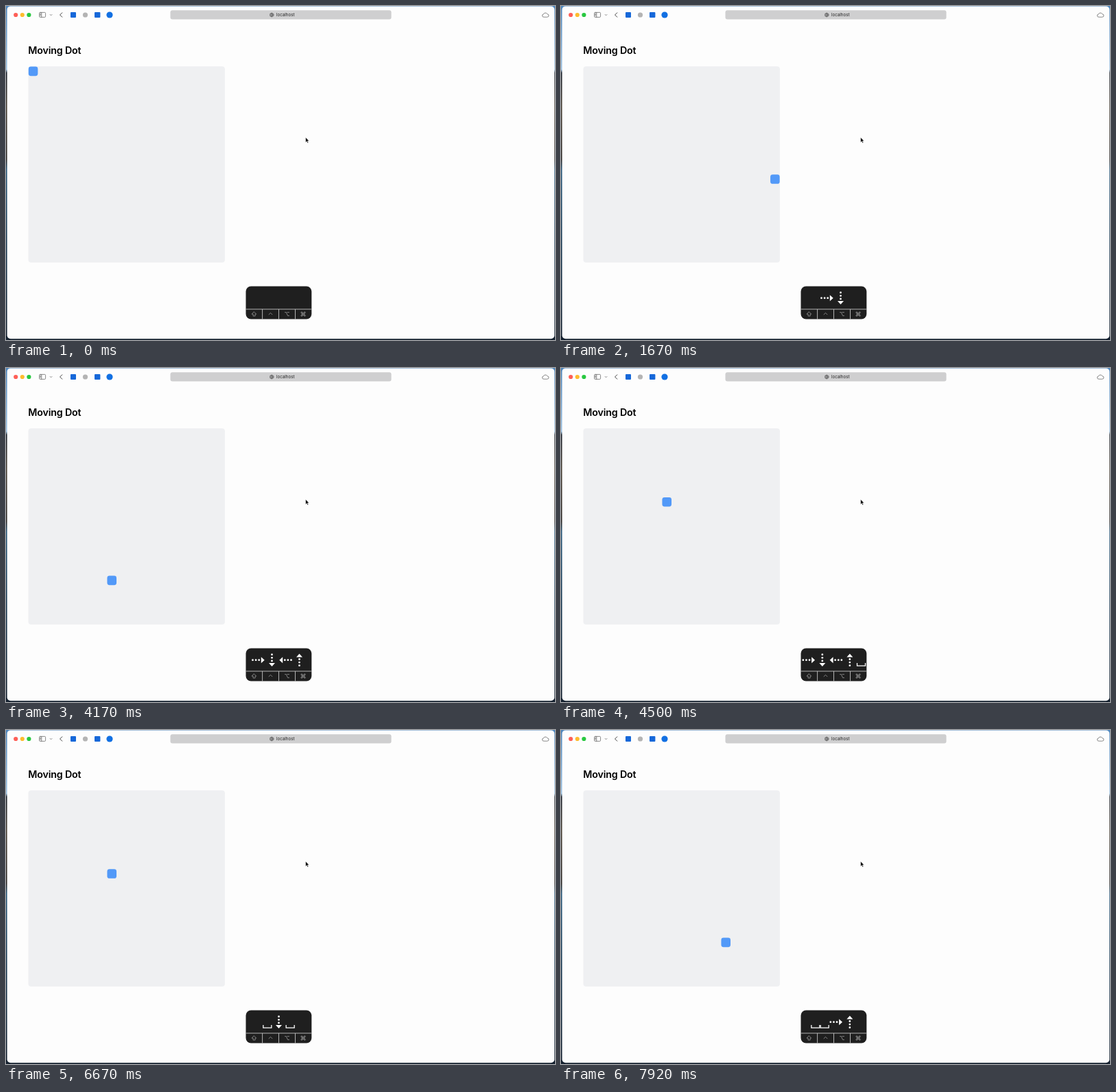
Animation, 800 px wide and 488 px high, one loop 8000 ms. Source, as an HTML page:

```html
<!DOCTYPE html>
<html lang="en">
<head>
<meta charset="utf-8">
<title>Moving Dot</title>
<style>
html, body { margin: 0; width: 100%; height: 100%; overflow: hidden; }
svg { display: block; width: 100vw; height: 100vh; }
text { font-family: Inter, "Liberation Sans", sans-serif; }
.line { fill: none; stroke-linecap: round; stroke-linejoin: round; }
</style>
</head>
<body>
<svg viewBox="0 0 800 488">
  <defs>
    <linearGradient id="desktop" x2="0" y2="1">
      <stop offset="0" stop-color="#4e86bd"/>
      <stop offset=".19" stop-color="#9fc4e4"/>
      <stop offset=".2" stop-color="#20262f"/>
      <stop offset=".3" stop-color="#4a4238"/>
      <stop offset=".46" stop-color="#2f2c2a"/>
      <stop offset=".49" stop-color="#2c5a7c"/>
      <stop offset=".7" stop-color="#1d3c55"/>
      <stop offset="1" stop-color="#15212f"/>
    </linearGradient>
    <g id="arrow" fill="#fff">
      <circle cx="-8" r="1.4"/><circle cx="-3.4" r="1.4"/><circle cx="1.2" r="1.4"/>
      <path d="M4.3 -4.5L9.2 0L4.3 4.5Z"/>
    </g>
    <path id="space" class="line" style="stroke-linecap:butt;stroke-linejoin:miter" stroke="#fff" stroke-width="1.3" d="M-6 4.4V8.5H6V4.4"/>
  </defs>

  <rect width="800" height="488" fill="url(#desktop)"/>
  <rect x="1.6" y=".4" width="797.6" height="485.8" rx="5" fill="#fdfdfd"/>

  <!-- toolbar -->
  <circle cx="14.2" cy="13" r="3.1" fill="#fe5f57"/>
  <circle cx="23.8" cy="13" r="3.1" fill="#febc2e"/>
  <circle cx="33.4" cy="13" r="3.1" fill="#28c840"/>
  <g class="line" stroke="#6b6b6b" stroke-width=".8">
    <rect x="48.6" y="9.4" width="9" height="7" rx="1.2"/>
    <path d="M51.8 9.4V16.4M49.7 11.2H50.7M49.7 12.6H50.7M49.7 14H50.7"/>
    <path d="M64.2 12.4L65.6 13.8L67 12.4"/>
    <path d="M81.8 9.8L78.6 13L81.8 16.2" stroke="#444" stroke-width="1"/>
    <path d="M783.6 16.2A2.1 2.1 0 0 1 783.3 12A2.9 2.9 0 0 1 788.7 11.8A2.2 2.2 0 0 1 788.8 16.2Z"/>
  </g>
  <rect x="94" y="9" width="8" height="8" rx="1" fill="#1668d9"/>
  <circle cx="115.5" cy="13" r="3.6" fill="#b4b4b4"/>
  <rect x="129" y="9" width="8.4" height="8" rx="1" fill="#1668d9"/>
  <circle cx="151" cy="13" r="4.6" fill="#1270e3"/>
  <rect x="239.5" y="6.2" width="322" height="13.4" rx="3" fill="#cfcfd0"/>
  <g class="line" stroke="#555" stroke-width=".5">
    <circle cx="387.2" cy="13" r="2.8"/>
    <ellipse cx="387.2" cy="13" rx="1.3" ry="2.8"/>
    <path d="M384.4 13H390M387.2 10.2V15.8M384.9 11.5H389.5M384.9 14.5H389.5"/>
  </g>
  <text x="394" y="15.3" font-size="6.2" fill="#222">localhost</text>

  <!-- page -->
  <text x="32.3" y="69.9" font-size="14.3" font-weight="600" letter-spacing="-.2">Moving Dot</text>
  <rect x="32.5" y="88.3" width="286.4" height="286.4" rx="4" fill="#eff0f2"/>
  <rect id="dot" width="13.6" height="13.6" rx="3.4" fill="#5299f8"/>
  <path d="M436.6 191.9V199.2L438.3 197.7L439.4 200.3L440.6 199.8L439.5 197.2H441.6Z" stroke="#fff" stroke-width=".5"/>

  <!-- pressed keys -->
  <rect x="349.5" y="409.5" width="95.8" height="48" rx="7.5" fill="#1f1f1f"/>
  <path d="M349.5 443H445.3M373.6 443V457.5M397.5 443V457.5M421.5 443V457.5" stroke="#c4c4c4" stroke-width=".9"/>
  <g class="line" stroke="#a2a2a2" stroke-width=".75">
    <path d="M361.6 447L364.7 450.2H363.1V453H360.1V450.2H358.5Z"/>
    <path d="M383 450.8L385.5 448.3L388 450.8"/>
    <path d="M406.5 447.6H408.3L410.6 452.6H412.5M409.9 447.6H412.5"/>
    <path d="M432 449H434.2V451.2H432ZM432 449H431A1.05 1.05 0 1 1 432 448ZM434.2 449V448A1.05 1.05 0 1 1 435.2 449ZM434.2 451.2H435.2A1.05 1.05 0 1 1 434.2 452.2ZM432 451.2V452.2A1.05 1.05 0 1 1 431 451.2Z"/>
  </g>
  <g id="keys"></g>
</svg>
<script>
const LOOP = 8000, FRAME = 1000 / 12, STEP = 35, CELL = 14.33;
const ANGLE = { R: 0, D: 90, L: 180, U: 270 };

// start time, direction, number of cells
const moves = [
  [270, 1, 0, 19], [1270, 0, 1, 19],
  [3610, -1, 0, 11], [3995, 0, -1, 12],
  [5615, 0, -1, 7], [6360, 0, 1, 8],
  [7440, 0, 1, 7], [7685, 1, 0, 6]
];

// time, keys on the panel (S is the space bar)
const presses = [
  [0, ""], [330, "R"], [1330, "RD"], [3660, "RDL"], [4080, "RDLU"],
  [4490, "RDLUS"], [5660, "LUSS"], [6410, "SSD"], [6660, "SDS"],
  [7410, "SDSS"], [7740, "DSSR"], [7910, "SSRU"]
];

const dot = document.getElementById("dot");
const panel = document.getElementById("keys");
let shown = "";

function drawKeys(keys) {
  if (keys === shown) return;
  shown = keys;
  const width = k => k === "S" ? 13.33 : 20;
  let x = 397.5 - [...keys].reduce((sum, k) => sum + width(k), 0) / 2;
  panel.innerHTML = [...keys].map(k => {
    const mid = x + width(k) / 2;
    x += width(k);
    return `<use href="#${k === "S" ? "space" : "arrow"}" transform="translate(${mid} 426.7) rotate(${ANGLE[k] || 0})"/>`;
  }).join("");
}

function draw(now) {
  const t = Math.floor((now % LOOP + 5) / FRAME) * FRAME % LOOP;
  let col = 0, row = 0;
  for (const [start, dx, dy, count] of moves) {
    const n = Math.max(0, Math.min(count, Math.floor((t - start) / STEP)));
    col += dx * n;
    row += dy * n;
  }
  dot.setAttribute("x", 32.8 + col * CELL);
  dot.setAttribute("y", 88.6 + row * CELL);
  drawKeys(presses.filter(p => p[0] <= t).pop()[1]);
}

const begin = performance.now();
function tick() {
  draw(performance.now() - begin);
  requestAnimationFrame(tick);
}
tick();
</script>
</body>
</html>
```
